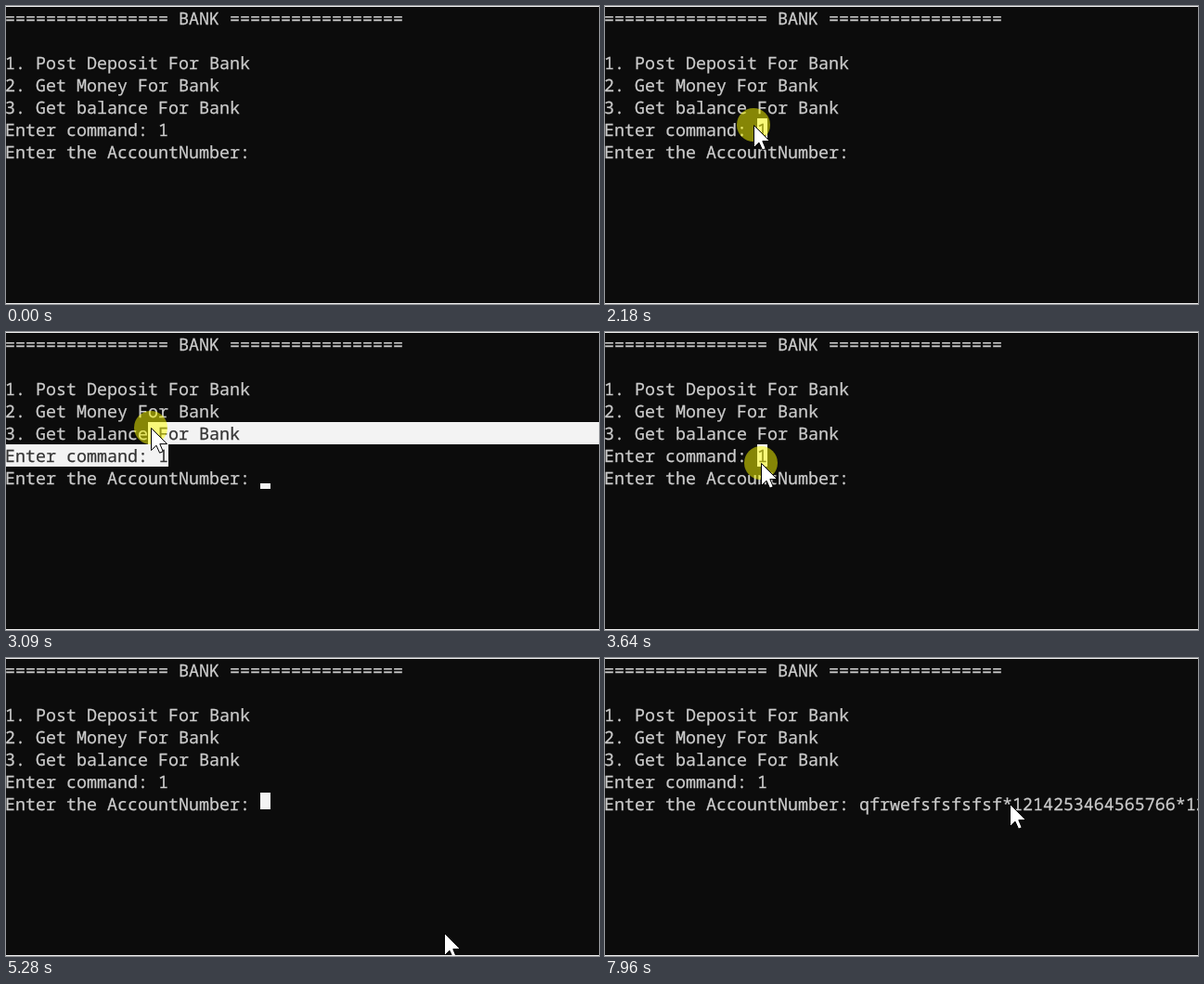
Write an HTML page that moves like this. It is 639 by 321 pixels and loops after 8000 ms.

```html
<!DOCTYPE html>
<html lang="en">
<head>
<meta charset="utf-8">
<title>Bank console</title>
<style>
  html, body { margin: 0; width: 100%; height: 100%; overflow: hidden; background: #0c0c0c; }
  .screen { position: absolute; left: 0; top: 0; width: 639px; height: 321px; overflow: hidden; background: #0c0c0c; isolation: isolate; }
  .screen::after { content: ""; position: absolute; inset: 0; height: 319px; border: solid #f0f0f0; border-width: 1px 0; }
  pre { position: absolute; left: -1px; top: 2px; margin: 0; color: #ccc; font: 18.33px/24px "Noto Sans Mono", monospace; text-rendering: geometricPrecision; font-variant-ligatures: none; -webkit-text-stroke: .25px #ccc; }

  .invert, .pasted, .press { animation: 8s step-end infinite; }

  /* Selection and caret both invert whatever they cover. */
  .invert { position: absolute; height: 24px; background: #fff; mix-blend-mode: difference; }
  .digit { left: 164px; top: 121px; width: 11px; animation-name: digit; }
  .upper { left: 153px; top: 97px; width: 486px; animation-name: drag; }
  .lower { left: 0; top: 121px; width: 164px; animation-name: drag; }
  .cell { left: 274px; top: 145px; width: 11px; animation-name: cell; }
  .caret { left: 274px; top: 163px; width: 11px; height: 6px; animation-name: blink; }
  .pasted { animation-name: paste; }

  .pointer { position: absolute; left: 0; top: 0; animation: move 8s infinite; }
  .pointer svg { position: absolute; left: 0; top: 0; overflow: visible; }
  .press { position: absolute; left: -18px; top: -18px; width: 36px; height: 36px; border-radius: 50%; background: rgb(255 255 0 / .5); animation-name: press; }

  @keyframes digit { 0%, 53.25%, 100% { opacity: 0 } 27.25% { opacity: 1 } }
  @keyframes drag { 0%, 41.25%, 100% { opacity: 0 } 34.25% { opacity: 1 } }
  @keyframes cell { 0%, 76.75%, 100% { opacity: 0 } 53.25% { opacity: 1 } }
  @keyframes paste { 0% { opacity: 0 } 76.75%, 100% { opacity: 1 } }
  @keyframes blink {
    0%, 11%, 24.875%, 44.375%, 58.5%, 72.625%, 100% { opacity: 0 }
    4.875%, 18%, 37.75%, 51%, 66% { opacity: 1 }
  }
  @keyframes press {
    0%, 11.875%, 47.125%, 54.875%, 100% { opacity: 0 }
    11%, 27.25%, 53.25% { opacity: 1 }
  }
  /* The pointer is redrawn about every 70 ms. */
  @keyframes move {
    0% { transform: translate(502px, 340px); animation-timing-function: step-end }
    1.375% { transform: translate(502px, 304px); animation-timing-function: steps(4) }
    4.875% { transform: translate(380px, 228px); animation-timing-function: steps(7) }
    11% { transform: translate(263px, 151px); animation-timing-function: steps(12) }
    21.5% { transform: translate(169px, 124px); animation-timing-function: steps(2) }
    23.25% { transform: translate(154px, 108px); animation-timing-function: step-end }
    24.875% { transform: translate(160px, 128px); animation-timing-function: step-end }
    27.25% { transform: translate(160px, 128px); animation-timing-function: steps(4) }
    30.75% { transform: translate(167px, 136px); animation-timing-function: steps(7) }
    36.875% { transform: translate(156px, 103px); animation-timing-function: step-end }
    38.625% { transform: translate(156px, 103px); animation-timing-function: steps(6) }
    43.875% { transform: translate(169px, 143px); animation-timing-function: step-end }
    45.5% { transform: translate(168px, 141px); animation-timing-function: step-end }
    47.125% { transform: translate(168px, 141px); animation-timing-function: steps(4) }
    50.625% { transform: translate(262px, 166px); animation-timing-function: steps(2) }
    52.375% { transform: translate(279px, 157px); animation-timing-function: step-end }
    56.5% { transform: translate(279px, 157px); animation-timing-function: steps(8) }
    63.5% { transform: translate(472px, 296px); animation-timing-function: step-end }
    71.75% { transform: translate(473px, 296px); animation-timing-function: step-end }
    89.875% { transform: translate(473px, 296px); animation-timing-function: steps(11) }
    99.5%, 100% { transform: translate(436px, 157px); animation-timing-function: step-end }
  }
</style>
</head>
<body>
<div class="screen">
<pre>================ BANK =================

1. Post Deposit For Bank
2. Get Money For Bank
3. Get balance For Bank
Enter command: 1
Enter the AccountNumber: <span class="pasted">qfrwefsfsfsfsf*1214253464565766*12</span></pre>
  <div class="invert digit"></div>
  <div class="invert upper"></div>
  <div class="invert lower"></div>
  <div class="invert cell"></div>
  <div class="invert caret"></div>
  <div class="pointer">
    <div class="press"></div>
    <svg width="18" height="28"><path d="M.5 .5V24.5L6 19.2 9.6 27.2 13.2 25.6 9.8 17.6H17.5Z" fill="#fff" stroke="#000"/></svg>
  </div>
</div>
</body>
</html>
```
